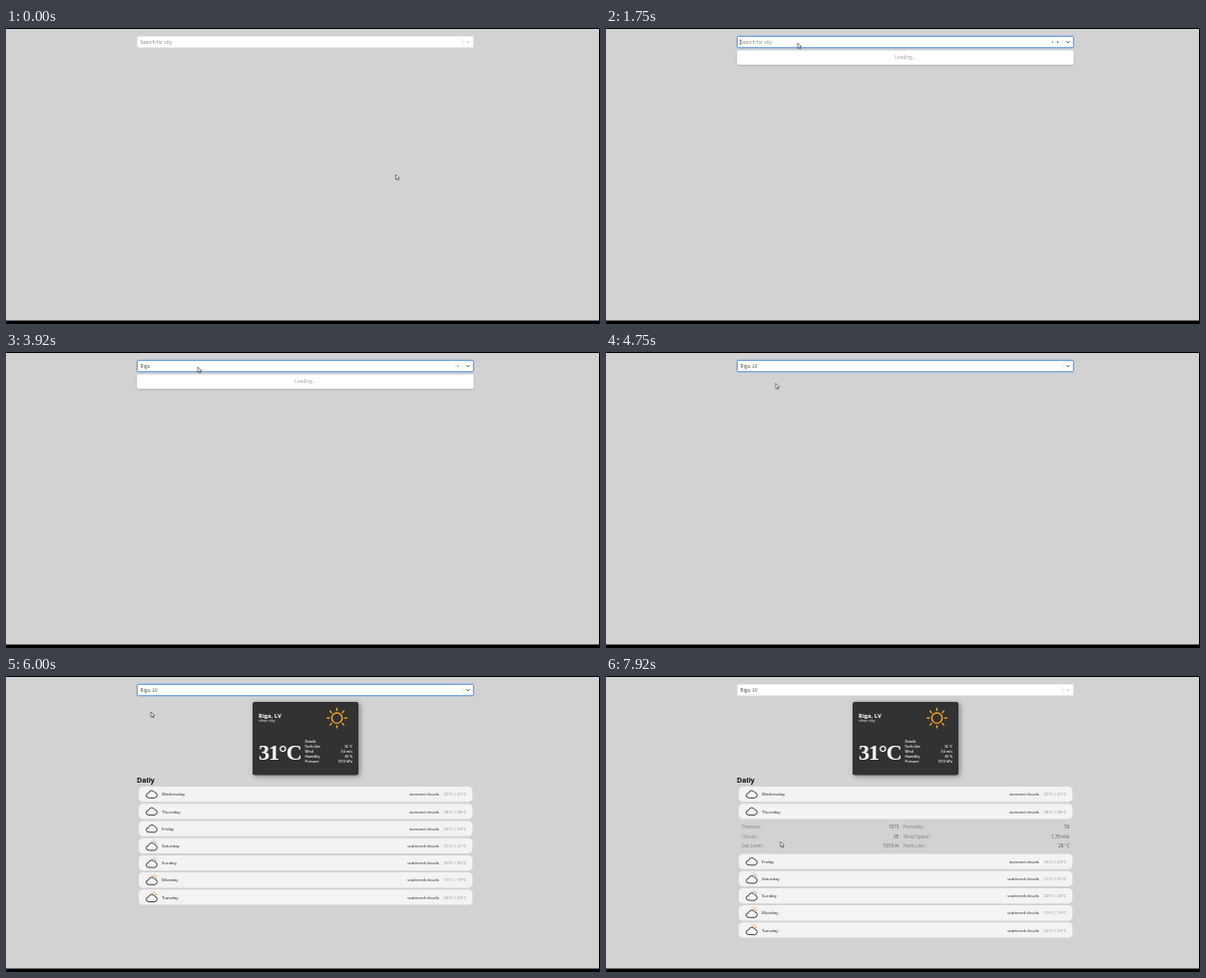
Write an HTML page that moves like this. It is 595 px wide and 297 px high and loops after 8000 ms.

```html
<!DOCTYPE html>
<html lang="en">
<head>
<meta charset="utf-8">
<title>City weather search</title>
<style>
  html, body { margin: 0; width: 100%; height: 100%; overflow: hidden; background: #000; }
  svg { display: block; width: 595px; height: 297px; }
  text { font-family: "Open Sans", "Noto Sans", sans-serif; white-space: pre; }
</style>
</head>
<body>
<svg id="stage" viewBox="0 0 595 297" xmlns="http://www.w3.org/2000/svg">
  <defs>
    <filter id="cardShadow" x="-20%" y="-20%" width="140%" height="140%">
      <feDropShadow dx="1.5" dy="1" stdDeviation="2.6" flood-opacity=".4"/>
    </filter>
    <filter id="menuShadow" x="-5%" y="-30%" width="110%" height="170%">
      <feDropShadow dx="0" dy=".8" stdDeviation=".8" flood-opacity=".2"/>
    </filter>
  </defs>
  <rect y="1" width="594" height="292.5" fill="#d2d2d2"/>
</svg>
<script>
const LOOP = 8000, STEP = 1000 / 12;
const stage = document.getElementById('stage');

function add(parent, tag, attrs = {}, content = '') {
  const node = document.createElementNS('http://www.w3.org/2000/svg', tag);
  for (const key in attrs) node.setAttribute(key, attrs[key]);
  node.textContent = content;
  return parent.appendChild(node);
}
const group = (parent, attrs) => add(parent, 'g', attrs);
const rect = (parent, x, y, width, height, fill, more) =>
  add(parent, 'rect', { x, y, width, height, fill, ...more });
const label = (parent, x, y, size, fill, content, more) =>
  add(parent, 'text', { x, y, 'font-size': size, fill, ...more }, content);
const right = { 'text-anchor': 'end' };
const show = (node, on) => node.setAttribute('visibility', on ? 'inherit' : 'hidden');
const within = (t, from, to) => t >= from && t < to;

// Weather card and daily list
const weather = group(stage);

function buildCard() {
  const card = group(weather);
  const bold = { 'font-weight': 700 }, semi = { 'font-weight': 600 };
  rect(card, 247, 26, 106, 73.4, '#333', { rx: 2, filter: 'url(#cardShadow)' });
  label(card, 253, 42, 5.9, '#fff', 'Riga, LV', bold);
  label(card, 253, 46.2, 4.15, '#fff', 'clear sky');
  label(card, 253, 84, 22, '#fff', '31°C',
    { ...bold, 'letter-spacing': -1, style: 'font-family:"Liberation Serif",serif' });

  const sun = group(card, { transform: 'translate(331.5 42.2)', stroke: '#f5a623',
    'stroke-width': 1.4, fill: 'none', 'stroke-linecap': 'round' });
  add(sun, 'circle', { r: 5.2 });
  for (let a = 0; a < 360; a += 45) add(sun, 'path', { d: 'M0-7.8V-9.7', transform: `rotate(${a})` });

  label(card, 299.5, 67, 3.3, '#fff', 'Details', semi);
  [['Feels Like', '32 °C'], ['Wind', '3.6 m/s'], ['Humidity', '45 %'], ['Pressure', '1013 hPa']]
    .forEach(([name, value], i) => {
      const y = 71.9 + i * 5.1;
      label(card, 299.5, y, 3.3, '#fff', name, semi);
      label(card, 347, y, 3.3, '#fff', value, { ...semi, ...right });
    });
}

function cloudIcon(parent, sunColor) {
  const icon = group(parent, { 'stroke-linecap': 'round', 'stroke-linejoin': 'round' });
  if (sunColor) {
    const sun = group(icon, { transform: 'translate(148 -2.6)', stroke: sunColor,
      'stroke-width': .6, fill: 'none' });
    add(sun, 'circle', { r: 1.7 });
    for (let a = -90; a <= 90; a += 45) add(sun, 'path', { d: 'M0-2.7V-3.4', transform: `rotate(${a})` });
  }
  add(icon, 'path', {
    d: 'M142.8 3.6a2.3 2.3 0 0 1-.1-4.6a3.4 3.4 0 0 1 6.3-.9a2.8 2.8 0 0 1 .2 5.5z',
    fill: '#f5f5f5', stroke: '#222', 'stroke-width': .85,
    transform: sunColor ? 'translate(0 .9)' : ''
  });
}

const dayRows = [
  ['Wednesday', 'overcast', 27], ['Thursday', 'overcast', 28], ['Friday', 'overcast', 23],
  ['Saturday', 'scattered', 21, '#a9adb8'], ['Sunday', 'scattered', 20, '#a9adb8'],
  ['Monday', 'scattered', 19, '#f0a050'], ['Tuesday', 'scattered', 23, '#f0a050']
].map(([day, sky, degrees, sunColor]) => {
  const row = group(weather);
  rect(row, 133, -7.7, 334.3, 15.3, '#f3f3f3', { rx: 4.2 });
  cloudIcon(row, sunColor);
  label(row, 156, 1.6, 4.3, '#222', day, { 'font-weight': 500 });
  label(row, 433.7, 1.6, 4.15, '#222', `${sky} clouds`, right);
  label(row, 461.2, 1.6, 4.3, '#888', `${degrees}°C / ${degrees}°C`, right);
  return row;
});

const panels = [
  ['1015', '53', '100', '0.88 m/s', '1015 m', '27 °C'],
  ['1015', '50', '95', '1.79 m/s', '1015 m', '28 °C']
].map(values => {
  const panel = group(weather);
  ['Pressure', 'Humidity', 'Clouds', 'Wind Speed', 'Sea Level', 'Feels Like'].forEach((name, i) => {
    const second = i % 2, y = 17.4 + (i >> 1) * 9.4;
    label(panel, second ? 298 : 136, y, 4.6, '#808080', `${name} :`);
    label(panel, second ? 464.3 : 293.5, y, 4.6, '#555', values[i], right);
  });
  return panel;
});

buildCard();
label(weather, 131, 107.4, 7.1, '#111', 'Daily', { 'font-weight': 700 });

function layoutDays(open) {
  dayRows.forEach((row, i) => {
    const y = 118.7 + i * 17.22 + (open >= 0 && i > open ? 33 : 0);
    row.setAttribute('transform', `translate(0 ${y})`);
    if (panels[i]) {
      panels[i].setAttribute('transform', `translate(0 ${y})`);
      show(panels[i], i === open);
    }
  });
}

// Search box
const box = rect(stage, 131.3, 8.3, 337, 11.5, '#fff', { rx: 1.2 });
const entry = label(stage, 134.5, 15.9, 4.8, '#333', '');
const caret = rect(stage, 0, 11.4, .5, 5.6, '#222');
rect(stage, 457.1, 10.6, .4, 7, '#ccc');
const chevron = add(stage, 'path', { d: 'M461.4 13.4l1.6 1.6l1.6-1.6', fill: 'none', 'stroke-width': .8 });
const dots = [447.4, 450, 452.5].map(cx => add(stage, 'circle', { cx, cy: 14, r: .75, fill: '#333' }));

function buildMenu(options) {
  const menu = group(stage);
  const count = Math.max(1, options.length);
  rect(menu, 131.3, 22.4, 337, 2.4 + count * 12, '#fff', { rx: 1.2, filter: 'url(#menuShadow)' });
  if (!options.length)
    label(menu, 300, 31.4, 4.8, '#999', 'Loading...', { 'text-anchor': 'middle' });
  options.forEach((name, i) => {
    if (!i) rect(menu, 131.3, 23.6, 337, 12, '#deebff');
    label(menu, 135, 31.4 + i * 12, 4.8, '#333', name);
  });
  return menu;
}
const loadingMenu = buildMenu([]);
const startMenu = buildMenu(['Aixirivall, AD', 'Aixovall, AD', 'Aixàs, AD', 'Anyós, AD', 'Arinsal, AD']);
const matchMenu = buildMenu(['Riga, LV', 'Rigacikun, NG']);

const pointer = add(stage, 'path', {
  d: 'M0 0V5.1L1.2 4.1L2 5.9L2.9 5.5L2.1 3.7H3.7Z', fill: '#fff', stroke: '#222', 'stroke-width': .55
});

// Timed states
const CLICK = 1500, BLUR = 6920, CHOSEN = 4580;
const typed = [[0, ''], [2420, 'R'], [2920, 'Ri'], [3000, 'Rig'], [3170, 'Riga'], [CHOSEN, 'Riga, LV']];
const path = [
  [0, 390.5, 147], [170, 349, 128], [420, 349, 128], [500, 356, 133], [830, 200, 50],
  [1000, 154, 12], [1080, 175, 6], [1170, 192, 15.2], [4090, 192, 15.2], [4420, 170, 31.5],
  [5170, 170, 31.5], [5500, 332, 100], [5750, 240, 177], [6000, 147, 34.8], [6080, 118, 55],
  [6170, 109, 85], [6500, 140, 177], [6830, 179.3, 119.3], [7000, 179.3, 119.3],
  [7330, 129, 148], [7670, 174.8, 166.3], [LOOP, 174.8, 166.3]
];

const lastAt = (table, t) => table.filter(entry => entry[0] <= t).pop();

function pointerAt(t) {
  const i = Math.max(1, path.findIndex(p => p[0] > t));
  const [t0, x0, y0] = path[i - 1], [t1, x1, y1] = path[i];
  const k = (t - t0) / (t1 - t0);
  return [x0 + (x1 - x0) * k, y0 + (y1 - y0) * k];
}

// Each dot stays solid until its own delay has passed, then pulses once a second.
function dotOpacity(age, i) {
  const local = age - i * 160;
  if (local < 0) return 1;
  const k = Math.max(0, 1 - Math.abs(local % 1000 / 400 - 1));
  return k * k * (3 - 2 * k);
}

function draw(time) {
  const n = Math.floor((time + 4) / STEP);
  const t = n ? n * STEP + 5 : 0;
  const focused = within(t, CLICK, BLUR);
  box.setAttribute('stroke', focused ? '#3a82d8' : '#ccc');
  box.setAttribute('stroke-width', focused ? .9 : .3);
  chevron.setAttribute('stroke', focused ? '#444' : '#bbb');

  const [since, value] = lastAt(typed, t);
  entry.textContent = value || 'Search for city';
  entry.setAttribute('fill', value ? '#444' : '#808080');
  const blinkAge = t - Math.max(since, CLICK);
  show(caret, within(t, CLICK, CHOSEN) && blinkAge % 1000 < 500);
  caret.setAttribute('x', value ? 134.7 + entry.getComputedTextLength() : 134.3);

  const firstLoad = within(t, CLICK, 2250), secondLoad = within(t, 2750, 4080);
  show(loadingMenu, firstLoad || secondLoad);
  show(startMenu, within(t, 2250, 2750));
  show(matchMenu, within(t, 4080, CHOSEN));
  dots.forEach((dot, i) => {
    show(dot, firstLoad || secondLoad);
    dot.setAttribute('opacity', dotOpacity(t - (firstLoad ? CLICK : 3060), i));
  });

  weather.setAttribute('visibility', t >= 5000 ? 'visible' : 'hidden');
  layoutDays(t < 7000 ? -1 : t < 7920 ? 0 : 1);
  pointer.setAttribute('transform', `translate(${pointerAt(t)})`);
}

const start = performance.now();
function frame() {
  draw((performance.now() - start) % LOOP);
  requestAnimationFrame(frame);
}
frame();
</script>
</body>
</html>
```
